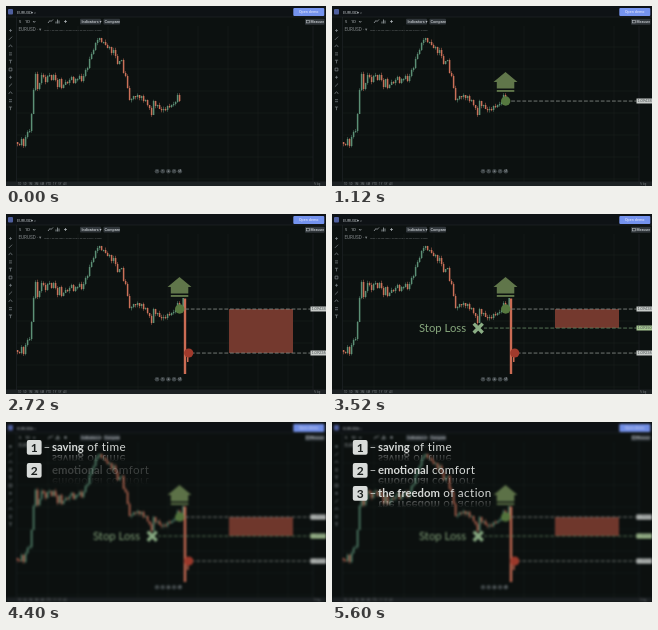
An HTML page that plays this animation: 320x180 px, repeating every 5680 ms.

```html
<!DOCTYPE html>
<html lang="en">
<head>
<meta charset="utf-8">
<title>Stop loss chart</title>
<style>
html, body { margin: 0; width: 100%; height: 100%; overflow: hidden; background: #0c1110; }
svg { position: absolute; inset: 0; width: 100%; height: 100%; }
text { font-family: Lato, "Open Sans", sans-serif; }
.ui text { font-family: Roboto, Arial, sans-serif; fill: #b4b9bd; }
.pop { transform-box: fill-box; transform-origin: center; }
.say { font-size: 11.7px; letter-spacing: .4px; }
.say tspan { font-size: 11.3px; font-weight: 700; letter-spacing: 0; }
</style>
</head>
<body>
<svg id="scene" viewBox="0 0 320 180">
  <defs>
    <pattern id="dash" width="5.6" height="4" patternUnits="userSpaceOnUse">
      <rect width="3.8" height="4" fill="#7c827e"/>
    </pattern>
    <pattern id="dashGreen" width="5.6" height="4" patternUnits="userSpaceOnUse">
      <rect width="3.8" height="4" fill="#5d7d5c"/>
    </pattern>
  </defs>
  <rect width="320" height="180" fill="#0c1110"/>
  <g id="grid" stroke="#181f1d" stroke-width=".6"></g>
  <g class="ui">
    <path d="M0 0H320V11H0Z" fill="#0e1215"/>
    <path d="M0 175.6H320V180H0Z" fill="#1c2123"/>
    <path d="M0 11H320M10.5 11V176M307 20V176" fill="none" stroke="#22282a" stroke-width=".6"/>
    <rect x="2" y="3" width="5" height="5.5" rx="1" fill="#4f5f9e"/>
    <text x="11" y="7.6" font-size="4">EURUSD</text>
    <text x="25" y="7.6" font-size="4">▾ ⌕</text>
    <rect x="287.3" y="2" width="31" height="8" rx="1" fill="#7593ee"/>
    <text x="302.7" y="7.3" font-size="3.8" text-anchor="middle" style="fill:#eef">Open demo</text>
    <text x="13" y="17.2" font-size="4">5</text>
    <text x="19" y="17.2" font-size="4">1D</text>
    <path d="M27 15l1.2 1.4L29.4 15M42 17l2-2.5 1 1 2-2M50 17.5v-2M51.5 17.5v-4M53 17.5v-3M58 15.5h3M59.5 14v3" fill="none" stroke="#b4b9bd" stroke-width=".7"/>
    <rect x="74" y="12.7" width="21" height="5.8" rx=".8" fill="#30363a"/>
    <text x="75.5" y="17" font-size="3.8" font-weight="700">Indicators ▾</text>
    <rect x="97.5" y="12.7" width="16.5" height="5.8" rx=".8" fill="#30363a"/>
    <text x="98.6" y="17" font-size="3.8" font-weight="700">Compare</text>
    <rect x="299" y="12.7" width="19.5" height="6" rx=".8" fill="#30363a"/>
    <rect x="300.5" y="14.3" width="3" height="2.6" fill="none" stroke="#b4b9bd" stroke-width=".6"/>
    <text x="304.5" y="17.2" font-size="3.5" font-weight="700">Measure</text>
    <text x="12.5" y="25.3" font-size="4.6" opacity=".7">EURUSD · ▾</text>
    <text x="38" y="25" font-size="2.3" opacity=".6">Open 1.09426 High 1.09462 Low 1.09420 Close 1.09438</text>
    <text x="12" y="179" font-size="2.7" opacity=".6">1D &#160; 5D &#160; 1M &#160; 3M &#160; 6M &#160; YTD &#160; 1Y &#160; 5Y &#160; All</text>
    <text x="308" y="179" font-size="2.7" opacity=".6">% log</text>
    <g id="tools" fill="none" stroke="#7d8489" stroke-width=".7"></g>
    <g id="nav"></g>
  </g>
  <g id="candles"></g>
  <rect id="spike" x="176.4" width="1.6" y="95" height="0" fill="#5c9076"/>
  <rect id="crash" x="177.8" width="2.4" y="84.5" height="0" fill="#cb6c54"/>
  <rect id="rebound" x="181" width="1.5" y="148" height="0" fill="#cb6c54"/>
  <rect id="zone" x="223" y="95" width="64" height="0" fill="#74392e"/>
  <g id="levels"></g>
  <g id="arrow" fill="#60764a">
    <path d="M173.5 63L185.5 73H182.3V79.6H164.8V73H161.5Z"/>
    <rect x="164.8" y="81" width="17.5" height="1.9"/>
  </g>
  <circle id="buyDot" class="pop" cx="173.7" cy="95" r="4.7" fill="#56783f"/>
  <circle id="sellDot" class="pop" cx="182.7" cy="139" r="4.6" fill="#a03a2c"/>
  <path id="cross" class="pop" d="M141.7 109.6L150.7 118.8M150.7 109.6L141.7 118.8" stroke="#8aad84" stroke-width="3.4"/>
  <text id="stop" x="87" y="118" font-size="11.3" fill="#86a67c">Stop Loss</text>
</svg>
<svg id="list" viewBox="0 0 320 180">
  <defs>
    <linearGradient id="fade" x1="0" y1="1" x2="0" y2="0">
      <stop offset=".15" stop-color="#fff" stop-opacity=".34"/>
      <stop offset=".65" stop-color="#fff" stop-opacity="0"/>
    </linearGradient>
  </defs>
</svg>
<script>
const LOOP = 5680;
const $ = id => document.getElementById(id);
const add = (parent, markup) => parent.insertAdjacentHTML('beforeend', markup);
const sheet = [];

// Each step is [ms, declarations]; the last pose holds until the loop restarts.
function animate(id, steps, ease = 'ease-out') {
  const all = [[0, steps[0][1]], ...steps, [LOOP, steps[steps.length - 1][1]]];
  const frames = all.map(([ms, css]) => `${(ms / LOOP * 100).toFixed(3)}%{${css}}`).join('');
  sheet.push(`@keyframes ${id}{${frames}} #${id}{animation:${id} ${LOOP}ms ${ease} infinite}`);
}
const fadeIn = (id, from, to) => animate(id, [[from, 'opacity:0'], [to, 'opacity:1']], 'linear');
const popIn = (id, from, to) => animate(id, [
  [from, 'transform:scale(0)'], [from + (to - from) * .7, 'transform:scale(1.15)'], [to, 'transform:scale(1)']
]);

// Grid, drawing tools and chart navigation
for (let x = 42; x < 307; x += 30) add($('grid'), `<path d="M${x} 20V176"/>`);
for (let y = 41; y < 176; y += 22) add($('grid'), `<path d="M11 ${y}H307"/>`);
const icons = ['M-1.5 0H1.5M0-1.5V1.5', 'M-1.6 1.6L1.6-1.6', 'M-1.7 1Q0-3 1.7 1',
  'M-1.5-1H1.5M-1.5 1H1.5', 'M-1.6-1.5H1.6M0-1.5V1.7', 'M-1.4-1.4H1.4V1.4H-1.4Z'];
for (let i = 0; i < 11; i++)
  add($('tools'), `<path transform="translate(4.5 ${24.5 + i * 7.8})" d="${icons[i % 6]}"/>`);
['−', '‹', '+', '›', '↺'].forEach((sign, i) => {
  const x = 151 + i * 5.7;
  add($('nav'), `<circle cx="${x}" cy="165.2" r="2.3" fill="#3d4446"/>
    <text x="${x}" y="166.4" font-size="3.6" text-anchor="middle">${sign}</text>`);
});

// Price history: closing heights, one every two units
const closes = [138, 139, 133, 140, 131, 126, 125, 108, 84, 68, 83, 77, 69, 71, 76, 70, 69, 74, 69, 74,
  81, 73, 82, 79, 76, 77, 74, 71, 77, 73, 73, 70, 75, 70, 64, 62, 53, 48, 44, 37, 34, 32, 36, 36, 39, 42,
  41, 47, 44, 50, 58, 55, 54, 67, 70, 82, 94, 93, 90, 91, 89, 92, 90, 95, 94, 99, 102, 109, 95, 100, 99,
  103, 104, 103, 104, 100, 101, 99, 98, 96, 89, 95];
let seed = 7;
const rnd = () => (seed = seed * 16807 % 2147483647) / 2147483647;
closes.forEach((close, i) => {
  const open = i ? closes[i - 1] : 136, x = 11.6 + i * 2;
  const top = Math.min(open, close), h = Math.max(1.2, Math.abs(close - open));
  const wickTop = top - rnd() * 2.5, wickEnd = top + h + rnd() * 2.5;
  const fill = close <= open ? '#5c9076' : '#cb7059';
  add($('candles'), `<g fill="${fill}"><rect x="${x - .75}" y="${top}" width="1.5" height="${h}"/>
    <rect x="${x - .25}" y="${wickTop}" width=".5" height="${wickEnd - wickTop}"/></g>`);
});

// Dashed price levels with a tag on the axis
function level(id, x, y, start, end, price, dash, tagFill) {
  add($('levels'), `<rect id="${id}" x="${x}" y="${y - .4}" height=".9" width="0" fill="url(#${dash})"/>
    <g id="${id}Tag"><rect x="304.5" y="${y - 2.5}" width="15.5" height="5" fill="${tagFill}"/>
    <text x="305.5" y="${y + 1.4}" font-size="3.8" fill="#4a5052">${price}</text></g>`);
  animate(id, [[start, 'width:0px'], [end, `width:${304.5 - x}px`]], 'ease-in-out');
  fadeIn(id + 'Tag', end - 60, end + 40);
}
level('buy', 175, 95, 240, 560, '1.09438', 'dash', '#c6cac7');
level('sell', 185, 139, 1960, 2200, '1.09236', 'dash', '#c6cac7');
level('limit', 152, 114, 2900, 3080, '1.09350', 'dashGreen', '#a8c894');

popIn('buyDot', 60, 320);
animate('arrow', [
  [700, 'opacity:0;transform:translateY(18px)'],
  [860, 'opacity:1;transform:translateY(8px)'],
  [1120, 'opacity:1;transform:translateY(3px)'],
  [1320, 'opacity:1;transform:translateY(0px)']
], 'linear');
animate('spike', [[1340, 'y:95px;height:0px'], [1500, 'y:84px;height:11px']], 'linear');
animate('crash', [[1500, 'height:0px'], [1780, 'height:75.5px']], 'ease-in');
animate('rebound', [[1760, 'y:148px;height:0px'], [1860, 'y:139px;height:9px']], 'linear');
popIn('sellDot', 1800, 1960);
animate('zone', [[2040, 'height:0px'], [2320, 'height:44px'], [3200, 'height:44px'], [3480, 'height:19px']], 'ease-in-out');
popIn('cross', 2730, 2920);
fadeIn('stop', 2780, 3000);
animate('scene', [
  [3540, 'filter:blur(0px) brightness(1)'],
  [3780, 'filter:blur(.34vw) brightness(.96)']
], 'linear');

// Numbered benefits with a fading reflection
[['saving', 'of time'], ['emotional', 'comfort'], ['the freedom', 'of action']].forEach(([strong, rest], i) => {
  const n = i + 1, y = 18 + i * 23, base = y + 10.6, start = 3700 + i * 540;
  const words = `<tspan>${strong}</tspan> ${rest}`;
  add($('list'), `<g id="box${n}"><rect x="20.8" y="${y}" width="14.8" height="14.8" rx="2" fill="#d9dcda"/>
    <text x="28.2" y="${y + 11.7}" font-size="12" font-weight="700" text-anchor="middle" fill="#1c201f">${n}</text></g>
    <g id="words${n}" class="say"><text x="46" y="${base}" fill="#d6d9d7">${words}</text>
    <text x="46" y="${base}" fill="url(#fade)" transform="matrix(1 0 0 -1 0 ${2 * base + 4})">${words}</text></g>
    <text id="bar${n}" class="say" x="37.5" y="${base}" fill="#d6d9d7">–</text>`);
  fadeIn('box' + n, start, start + 100);
  fadeIn('words' + n, start + 130, start + 260);
  fadeIn('bar' + n, start + 240, start + 340);
});

add(document.head, `<style>${sheet.join('\n')}</style>`);
</script>
</body>
</html>
```
